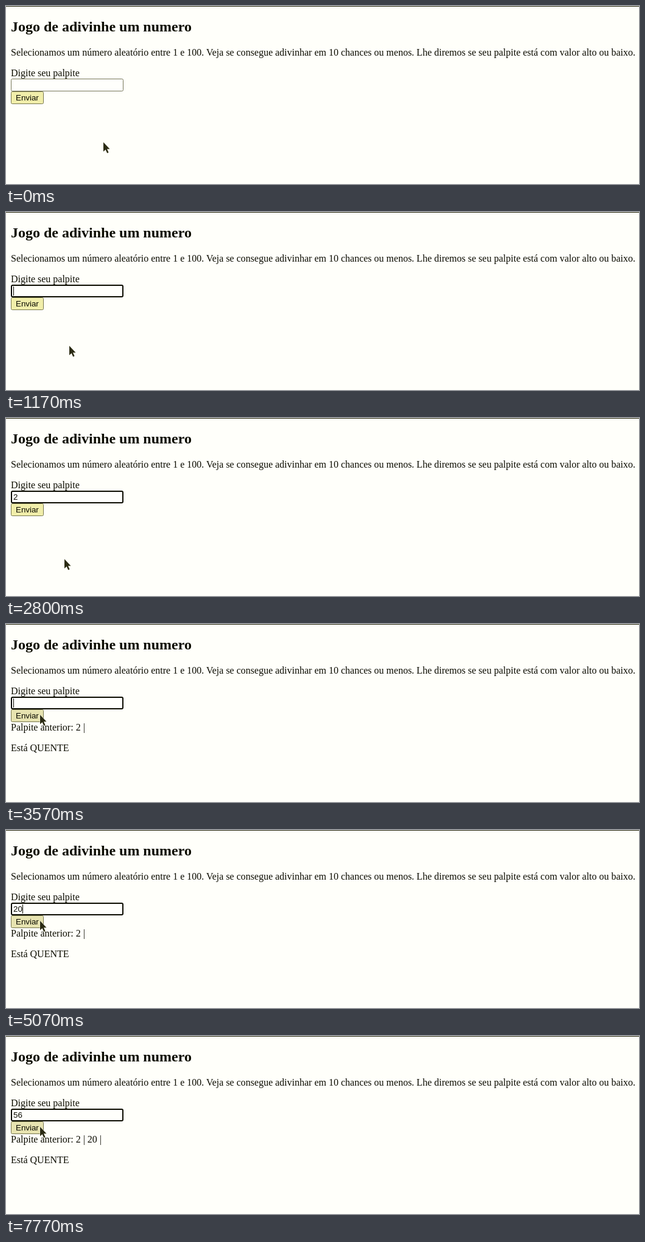
Recreate the animation shown at these times as an HTML page. Size 1040 by 294 pixels, loop 8000 ms.

```html
<!DOCTYPE html>
<html lang="pt">
<head>
<meta charset="utf-8">
<title>Jogo</title>
<style>
  html, body { margin: 0; width: 100%; height: 100%; overflow: hidden; background: #fffffa; }
  svg { display: block; width: 1040px; height: 294px; }
  text { font: 16px "Liberation Serif", "Times New Roman", serif; fill: #0b0b00; white-space: pre; }
  .title { font-size: 24px; font-weight: bold; }
  .ui { font: 13.333px "Liberation Sans", Arial, sans-serif; }
</style>
</head>
<body>
<svg viewBox="0 0 1040 294">
  <rect width="1040" height="294" fill="#fffffa"/>
  <rect width="1040" height="1" fill="#242408"/>
  <text class="title" x="8" y="42">Jogo de adivinhe um numero</text>
  <text x="8" y="82">Selecionamos um número aleatório entre 1 e 100. Veja se consegue adivinhar em 10 chances ou menos. Lhe diremos se seu palpite está com valor alto ou baixo.</text>
  <text x="8" y="116">Digite seu palpite</text>
  <rect id="button" x="8.5" y="141.5" width="53" height="20" rx="2" stroke="#77774f"/>
  <text class="ui" x="16" y="156">Enviar</text>
  <rect id="field" fill="#fffffc"/>
  <text class="ui" id="value" x="12" y="135"></text>
  <rect id="caret" y="123" width="1" height="15" fill="#0b0b00"/>
  <text id="guesses" x="8" y="176"></text>
  <text id="hint" x="8" y="210"></text>
  <path id="arrow" d="M0 0V15.5L3.6 12.2L6.2 18L8.6 17L6 11.2H10.5Z" fill="#2b2b14" stroke="#fffff0" stroke-width="1" paint-order="stroke"/>
  <path id="beam" d="M-3 -7.5H-1L0.5 -6.5L2 -7.5H4M0.5 -6.5V7.5M-3 8.5H-1L0.5 7.5L2 8.5H4" fill="none" stroke="#2b2b14"/>
</svg>
<script>
const LOOP = 8000, BLINK = 530, DIGIT = 7.415;
const FOCUS = 700;
const $ = id => document.getElementById(id);

// time, x, y of the pointer
const path = [
  [0, 160, 225], [60, 160, 225], [560, 122, 131], [780, 122, 131],
  [1120, 104, 221], [1250, 104, 221], [1600, 96, 233],
  [2830, 96, 233], [3230, 56, 150]
];

// time, field value, guess list
const edits = [
  [0, "", ""], [FOCUS, "", ""], [2200, "2", ""], [3400, "", "2 | "],
  [4670, "2", "2 | "], [4870, "20", "2 | "], [5670, "", "2 | 20 | "],
  [7100, "5", "2 | 20 | "], [7730, "56", "2 | 20 | "]
];

const ease = k => k * k * (3 - 2 * k);

function pointerAt(t) {
  const i = path.findIndex(p => p[0] > t);
  if (i < 0) return path[path.length - 1].slice(1);
  const [t0, x0, y0] = path[i - 1], [t1, x1, y1] = path[i];
  const k = ease((t - t0) / (t1 - t0));
  return [Math.round(x0 + (x1 - x0) * k), Math.round(y0 + (y1 - y0) * k)];
}

function set(id, attrs) {
  for (const key in attrs) $(id).setAttribute(key, attrs[key]);
}

function show(id, on) {
  $(id).style.visibility = on ? "visible" : "hidden";
}

function drawField(focused) {
  const inset = focused ? 1 : 0.5;
  set("field", {
    x: 8 + inset, y: 120 + inset,
    width: 185 - 2 * inset, height: 21 - 2 * inset,
    rx: 2, "stroke-width": 2 * inset,
    stroke: focused ? "#0b0b00" : "#77775a"
  });
}

function render(t) {
  const [since, value, guesses] = edits.filter(e => e[0] <= t).pop();
  const focused = t >= FOCUS;
  drawField(focused);

  $("value").textContent = value;
  $("guesses").textContent = guesses && "Palpite anterior: " + guesses;
  $("hint").textContent = guesses && "Está QUENTE";

  const lit = Math.floor((t - since) / BLINK) % 2 === 0;
  set("caret", { x: 12 + Math.round(value.length * DIGIT) });
  show("caret", focused && lit && value !== "56");

  const [x, y] = pointerAt(t);
  const inField = x >= 8 && x < 193 && y >= 120 && y < 141;
  const onButton = x >= 8 && x < 62 && y >= 141 && y < 162;
  for (const id of ["arrow", "beam"]) set(id, { transform: `translate(${x} ${y})` });
  show("arrow", !inField);
  show("beam", inField);
  set("button", { fill: onButton ? "#e7e3b0" : "#f1eeaa" });
}

const start = performance.now();
function tick() {
  render((performance.now() - start) % LOOP);
  requestAnimationFrame(tick);
}
tick();
</script>
</body>
</html>
```
